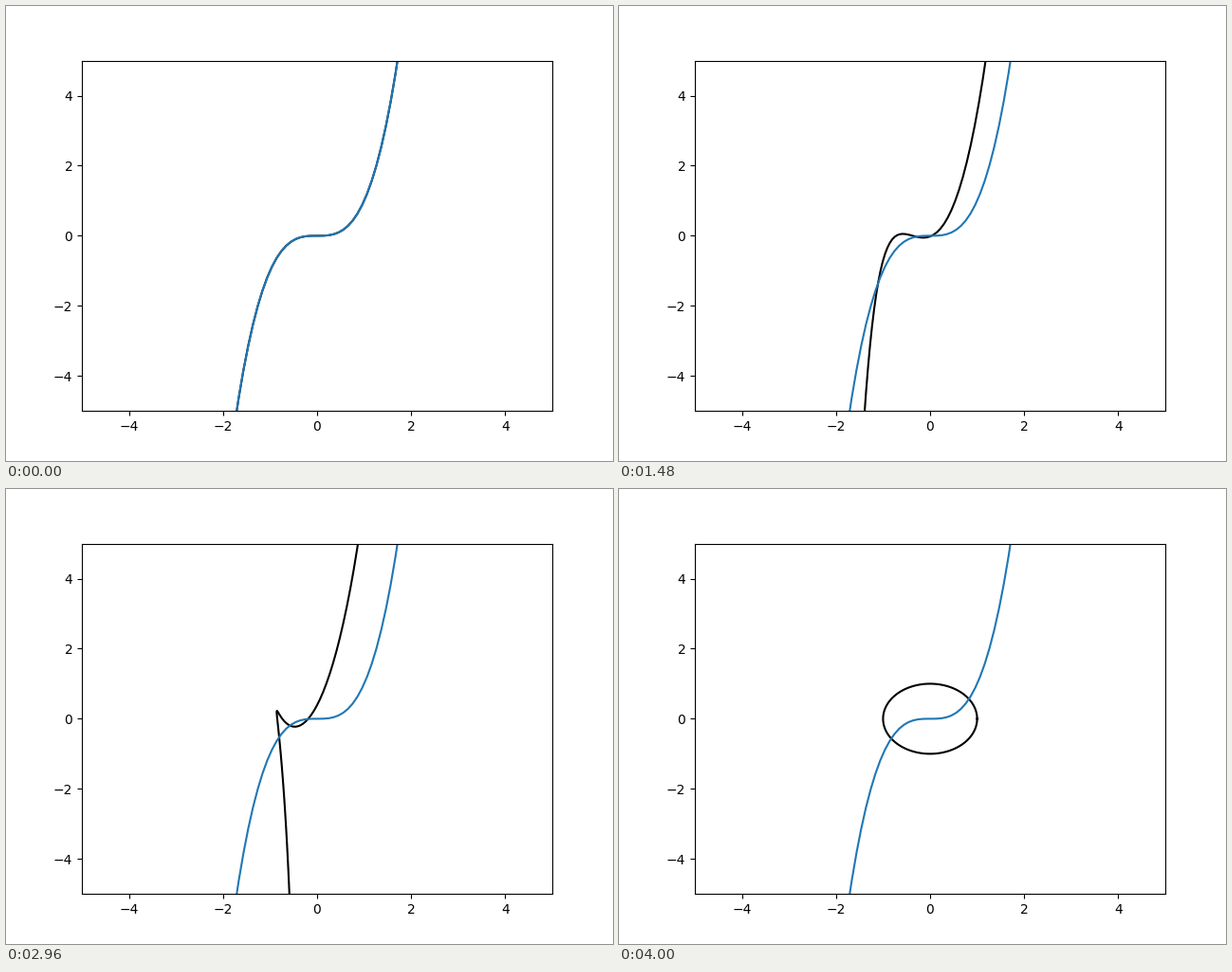
Write a matplotlib script that moves like this. It is 640 by 480 pixels and loops after 4040 ms.

```python
import numpy as np
import matplotlib.pyplot as plt
from matplotlib.animation import FuncAnimation

FRAMES = 101
INTERVAL = 40  # ms
LIMIT = 5

t = np.linspace(-LIMIT, LIMIT, 100)
cubic = np.array([t, t**3])
angle = np.pi * (1 + t / LIMIT)
circle = np.array([np.cos(angle), np.sin(angle)])


def blend(s):
    """Straight-line homotopy from the cubic (s=0) to the unit circle (s=1)."""
    return (1 - s) * cubic + s * circle


fig, ax = plt.subplots(figsize=(6.4, 4.8), dpi=100)
ax.set_xlim(-LIMIT, LIMIT)
ax.set_ylim(-LIMIT, LIMIT)
morph, = ax.plot(*blend(0), color="black")
ax.plot(*cubic, color="tab:blue")


def update(i):
    morph.set_data(*blend(i / (FRAMES - 1)))
    return morph,


anim = FuncAnimation(fig, update, frames=FRAMES, interval=INTERVAL,
                     repeat=True, repeat_delay=0)
plt.show()
```
